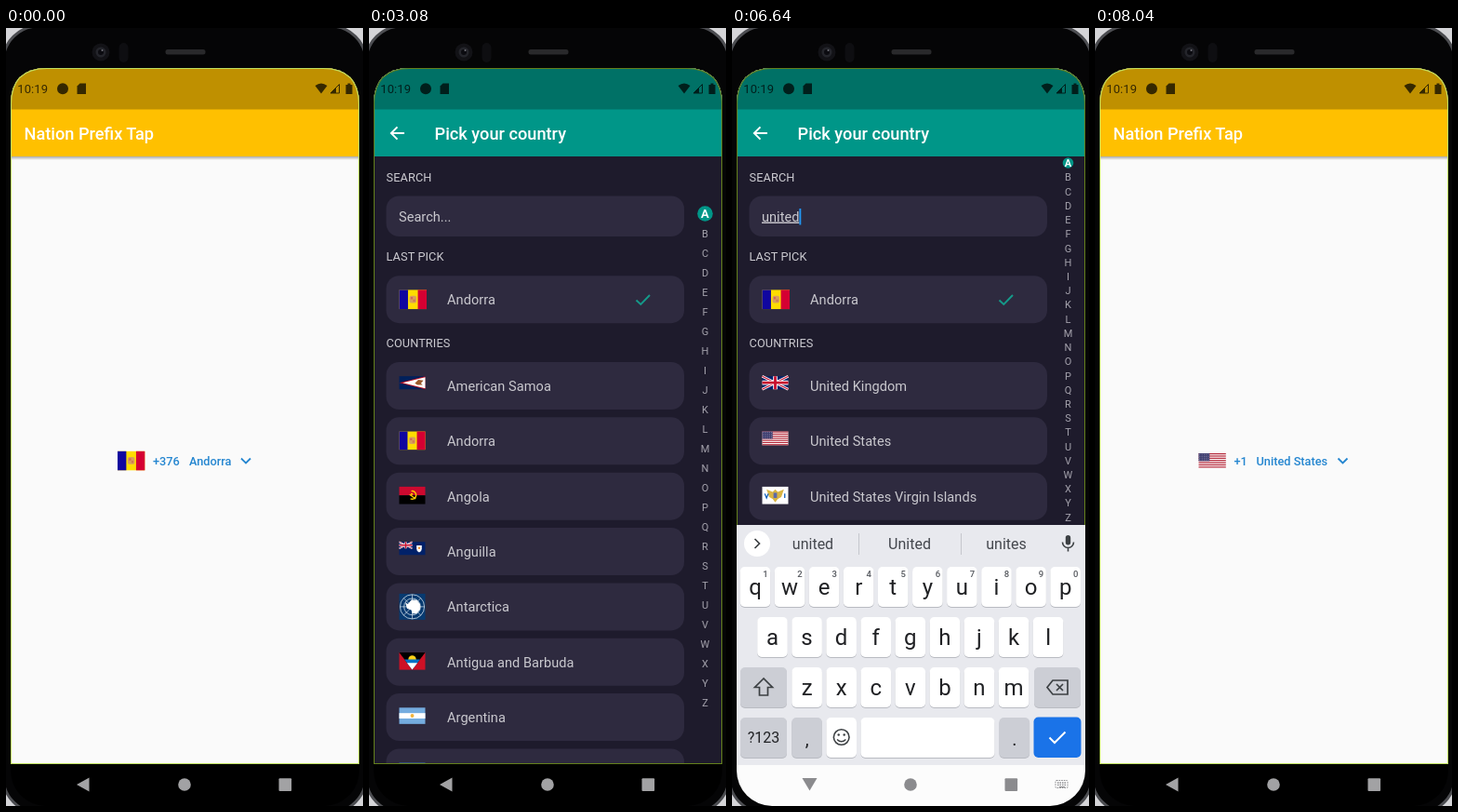
Animation, 384 px wide and 836 px high, one loop 8.08 s. Source, as an HTML page:

```html
<!DOCTYPE html>
<html lang="en">
<head>
<meta charset="utf-8">
<title>Country picker</title>
<style>
html, body { margin: 0; width: 100%; height: 100%; overflow: hidden; background: #000; }
svg { display: block; width: 100vw; height: 100vh; font-family: Roboto, sans-serif; }
svg svg { overflow: visible; }
text { white-space: pre; }
</style>
</head>
<body>
<svg id="stage" viewBox="0 0 384 836"></svg>
<script>
const LOOP = 8080, TICK = 40;
const $ = id => document.getElementById(id);
const set = (id, attrs) => { for (const k in attrs) $(id).setAttribute(k, attrs[k]); };

// SVG helpers
const rect = (x, y, w, h, fill, r = 0, more = '') =>
  `<rect x="${x}" y="${y}" width="${w}" height="${h}" rx="${r}" fill="${fill}" ${more}/>`;
const circ = (x, y, r, fill, more = '') => `<circle cx="${x}" cy="${y}" r="${r}" fill="${fill}" ${more}/>`;
const path = (d, fill) => `<path d="${d}" fill="${fill}"/>`;
const line = (d, color, w, more = '') => `<path d="${d}" fill="none" stroke="${color}" stroke-width="${w}" ${more}/>`;
const text = (x, y, size, fill, str, more = '') =>
  `<text x="${x}" y="${y}" font-size="${size}" fill="${fill}" ${more}>${str}</text>`;
const mid = 'text-anchor="middle"';
const medium = 'font-weight="500"';

// Flags, 30 units wide
const bars = (colors, h, side = 10) => rect(0, 0, 30, h, colors[1]) +
  rect(0, 0, side, h, colors[0]) + rect(30 - side, 0, side, h, colors[2]);
const jack = (w, h) => rect(0, 0, w, h, '#012169') +
  line(`M0 0L${w} ${h}M${w} 0L0 ${h}`, '#fff', h / 5) +
  line(`M0 0L${w} ${h}M${w} 0L0 ${h}`, '#c8102e', h / 13) +
  line(`M${w / 2} 0V${h}M0 ${h / 2}H${w}`, '#fff', h / 3) +
  line(`M${w / 2} 0V${h}M0 ${h / 2}H${w}`, '#c8102e', h / 5);
const stripes = () => {
  let s = rect(0, 0, 30, 15.8, '#fff');
  for (let i = 0; i < 7; i++) s += rect(0, i * 2.43, 30, 1.22, '#b22234');
  s += rect(0, 0, 12, 8.5, '#3c3b6e');
  for (let i = 0; i < 20; i++) s += circ(1.4 + i % 5 * 2.3, 1.2 + (i / 5 | 0) * 2, .42, '#fff');
  return s;
};
const globe = () => '<g transform="translate(0 -4)">' + rect(0, 0, 30, 30, '#073a70') +
  [14, 9.5].map(r => circ(15, 15, r, 'none', 'stroke="#dfe8f0" stroke-width=".8"')).join('') +
  line('M15 1V29M1 15H29M5 5L25 25M25 5L5 25', '#dfe8f0', .7) +
  path('M7 10L10 12L14 7L20 7L24 12L24 18L20 23L15 23L14 19L9 17Z', '#fff') + '</g>';
const flags = {
  ad: () => bars(['#10069f', '#fedd00', '#d50032'], 21, 9.6) + rect(11.2, 6.4, 7.6, 8, '#d9a05b', 2) +
    rect(12.6, 7.8, 2.2, 2.4, '#d5625c') + rect(15.2, 10.4, 2.2, 2.6, '#cf7a52'),
  as: () => rect(0, 0, 30, 15, '#00205b') + path('M30 0L0 7.5L30 15Z', '#bd1021') +
    path('M30 1L4 7.5L30 14Z', '#fff') + path('M18 8L22 4L28 5L25 8L27 10L21 10Z', '#9b5a2c'),
  ao: () => rect(0, 0, 30, 10, '#cc092f') + rect(0, 10, 30, 10, '#000') +
    line('M14 5A4.7 4.7 0 1 1 13 14M12 9L19 14', '#ffcb00', 1.5) + circ(14.5, 8.5, 1.2, '#ffcb00'),
  ai: () => rect(0, 0, 30, 15, '#012169') + jack(15, 7.5) +
    path('M20 4H26V8Q26 11 23 12Q20 11 20 8Z', '#fff') + circ(23, 7, 1.3, '#f0922e'),
  aq: globe,
  ag: () => rect(0, 0, 30, 20, '#ce1126') + path('M0 0H30L15 20Z', '#000') + circ(15, 8, 4.5, '#fcd116') +
    path('M6 8H24L15 20Z', '#0072c6') + path('M9 12H21L15 20Z', '#fff'),
  ar: () => rect(0, 0, 30, 18.8, '#74acdf') + rect(0, 6.3, 30, 6.2, '#fff') + circ(15, 9.4, 2.1, '#f2b43c'),
  aw: () => rect(0, 0, 30, 20, '#418fde') + rect(0, 13, 30, 1.2, '#fbe122') + rect(0, 15.5, 30, 1.2, '#fbe122') +
    path('M6 2L7 5L10 6L7 7L6 10L5 7L2 6L5 5Z', '#ef3340'),
  bi: () => rect(0, 0, 30, 18, '#ce1126') + path('M0 0L15 9L0 18ZM30 0L15 9L30 18Z', '#1eb53a') +
    line('M0 0L30 18M30 0L0 18', '#fff', 3) + circ(15, 9, 5, '#fff') +
    circ(15, 6.6, 1.2, '#ce1126') + circ(12.9, 10.4, 1.2, '#ce1126') + circ(17.1, 10.4, 1.2, '#ce1126'),
  gl: () => rect(0, 0, 30, 10, '#fff') + rect(0, 10, 30, 10, '#d00c33') +
    path('M5 10A6.5 6.5 0 0 1 18 10Z', '#d00c33') + path('M5 10A6.5 6.5 0 0 0 18 10Z', '#fff'),
  re: () => bars(['#002395', '#fff', '#ed2939'], 20),
  gb: () => jack(30, 15),
  us: stripes,
  vi: () => rect(0, 0, 30, 20, '#fff') + path('M5 3L12 6L15 3L18 6L25 3L22 12L18 14L15 18L12 14L8 12Z', '#d9b443') +
    rect(13, 7, 4, 6, '#5d6aa8') + line('M3 8L5 13L7 8M26 8V13', '#0057b7', 1.3)
};
const flag = (code, x, y, w) =>
  `<svg x="${x}" y="${y}" width="${w}" height="${w}" viewBox="0 0 30 30">${flags[code]()}</svg>`;

const names = {
  as: 'American Samoa', ad: 'Andorra', ao: 'Angola', ai: 'Anguilla', aq: 'Antarctica',
  ag: 'Antigua and Barbuda', ar: 'Argentina', aw: 'Aruba', bi: 'Burundi', gl: 'Kalaallit Nunaat',
  re: 'La Réunion', gb: 'United Kingdom', us: 'United States', vi: 'United States Virgin Islands'
};

// Timeline tables: [start ms, value]
const at = (table, t) => table.reduce((v, row) => t >= row[0] ? row[1] : v, table[0][1]);
const typed = [[0, ''], [4200, 'u'], [4520, 'un'], [4840, 'uni'], [5000, 'unit'], [5400, 'unite'], [5480, 'united']];
const found = [[0, 'as ad ao ai aq ag ar aw'], [4200, 'ai ag aw'], [4560, 'bi gl re'], [4840, 're gb us'], [5000, 'gb us vi']];
const hints = [[0, ''], [4200, 'u,you,I'], [4560, "un,in,I'm"], [5000, 'unit,United,units'],
  [5400, 'unite,United,unites'], [5480, 'united,United,unites'], [6680, '']];
const caret = [[0, 0], [3320, 1], [5640, .5], [5680, 0], [5840, .5], [5960, 1], [6680, 0]];

const clamp = v => Math.min(1, Math.max(0, v));
function bezier(x1, y1, x2, y2, x) {
  const f = (a, b, s) => 3 * (1 - s) * (1 - s) * s * a + 3 * (1 - s) * s * s * b + s * s * s;
  let lo = 0, hi = 1;
  for (let i = 0; i < 24; i++) {
    const m = (lo + hi) / 2;
    f(x1, x2, m) < x ? lo = m : hi = m;
  }
  return f(y1, y2, lo);
}

// Static pieces
const SCREEN = 'M5 791V82Q5 43 44 43H341Q380 43 380 82V791Z';
const GLASS = 'M5 500H380V798A38 38 0 0 1 342 836H43A38 38 0 0 1 5 798Z';
const card = (y, h) => rect(18.5, y, 320.5, h, '#2e2a3f', 14);
const label = (y, s) => text(18.5, y, 12.75, '#cbcad0', s, 'letter-spacing=".1"');
const item = (code, cy, w) => card(cy - 25.5, 51) + flag(code, 32.5, cy - 10.3, w) +
  text(84, cy + 5.3, 14.6, '#c9c8ce', names[code], 'letter-spacing=".03"');
const rows = list => list.split(' ').map((c, i) => item(c, 384.5 + i * 59.35, 28)).join('');

const phone = () => rect(0, 0, 384, 836, '#d5d5d8') +
  rect(-3, -2, 390, 845, '#050506', 38, 'stroke="#4c4d51" stroke-width="3"') +
  circ(102, 26, 9.5, '#121216') + circ(102, 26, 5.5, '#24252b') + circ(102, 26, 3, '#0b0b10') + circ(103.5, 24, 1, '#75757c') +
  rect(121.5, 16, 10, 21, '#0e0e11', 5) + rect(171.5, 23, 43, 5.5, '#29292b', 2.5) + path(GLASS, '#000');

const home = () => rect(5, 43, 375, 748, '#fafafa') +
  rect(5, 138, 375, 4, 'url(#shade)') + rect(5, 43, 375, 95, '#ffc000') +
  text(19.5, 120, 18.2, '#fff', 'Nation Prefix Tap', medium) +
  '<g id="pick"><g id="ripple" clip-path="url(#button)">' + circ(237.5, 465, 25, '#eff5fa') + '</g>' +
  '<g id="choice"></g></g>';
const choice = code => {
  const us = code === 'us', x = us ? 111.5 : 120, name = us ? 173.5 : 197, arrow = us ? 266.5 : 258;
  return flag(code, x, us ? 457 : 454.8, 29.3) +
    text(us ? 149.5 : 158, 469.5, 12.76, '#2586d0', us ? '+1' : '+376', medium) +
    text(name, 469.5, 12.76, '#2586d0', names[code], medium) +
    line(`M${arrow - 5} 462.5l5 5l5 -5`, '#2586d0', 1.8);
};

const list = () => rect(5, 43, 375, 748, '#fafafa') + rect(5, 43, 375, 95, '#009688') +
  line('M38 113H24M30.5 106.3L23.8 113L30.5 119.7', '#fff', 1.9) +
  text(70.5, 120, 18.2, '#fff', 'Pick your country', medium) +
  '<g clip-path="url(#body)">' + rect(5, 138, 375, 653, '#1e1b2c') +
  label(164.5, 'SEARCH') + card(180.5, 43.5) +
  '<text id="query" x="32" y="207.5" font-size="14.6" fill="#c9c8ce"></text>' +
  '<rect id="caret" y="194" width="1.9" height="17.5" fill="#2196f3"/>' +
  label(250, 'LAST PICK') + item('ad', 291.7, 29.5) + line('M287.5 292.5L292.3 297L302 287', '#159a8a', 1.9) +
  label(343, 'COUNTRIES') + '<g id="rows"></g><g id="index"></g></g>';

const index = small => {
  const top = small ? 145 : 199.5, gap = small ? 15.22 : 21.03;
  return circ(361.5, top, small ? 5.8 : 8.3, '#009688') + [...'ABCDEFGHIJKLMNOPQRSTUVWXYZ'].map((c, i) =>
    text(361.5, top + i * gap + 4.2, i || small ? 11 : 13, i ? '#a5a3ad' : '#fff', c,
      mid + (i ? '' : ' font-weight="700"'))).join('');
};

const status = () => rect(5, 43, 375, 44.5, '#000', 0, 'opacity=".25"') + '<g opacity=".72">' +
  text(12.3, 70, 13, '#000', '10:19', 'letter-spacing=".1"') + circ(61, 65.3, 6, '#000') +
  path('M79.5 59.5H86V71H76.5V62.5Z', '#000') +
  path('M332.5 62Q339 57 345.5 62L339 70.5Z', '#000') +
  line('M349 70L358.5 60.5V70Z', '#000', 1) + path('M349 70L355 64V70Z', '#000') +
  path('M365.5 61H367.5V59.5H370.5V61H372.5V71H365.5Z', '#000') + '</g>';

function keyboard() {
  const ink = '#202124', icon = '#3c4043', grey = '#ccced5', pitch = 37.07;
  const key = (x, y, w, fill) => rect(x, y + 1, w, 43, '#b9bbc2', 5) + rect(x, y, w, 43, fill, 5);
  const letters = (str, x, y, digits) => [...str].map((c, i) => {
    const cx = x + i * pitch;
    return key(cx - 16.3, y, 32.6, '#fff') + text(cx, y + 29.5, 24, ink, c, mid) +
      (digits ? text(cx + 11, y + 11, 9.5, '#55585e', (i + 1) % 10, mid + medium) : '');
  }).join('');
  return rect(5, 534, 375, 258, '#e8e9ee') + rect(5, 792, 375, 44, '#fcfcfc') +
    circ(27, 554, 14, '#fff') + line('M24.5 549L29.5 554L24.5 559', icon, 1.7) +
    '<g id="hints"></g>' +
    rect(358.8, 545, 5.4, 10.5, icon, 2.7) + line('M355.5 552.5a6 6 0 0 0 12 0M361.5 558.5V562.5', icon, 1.6) +
    letters('qwertyuiop', 25, 579, true) + letters('asdfghjkl', 43.5, 633) + letters('zxcvbnm', 80.6, 687) +
    key(9, 687, 50, grey) + line('M34 699L24.5 708.5H29.5V717H38.5V708.5H43.5Z', icon, 1.7) +
    key(325, 687, 50, grey) + line('M339 708.5L345 701H361V716H345ZM349 705L356 712M356 705L349 712', icon, 1.7) +
    key(9, 741, 50, grey) + text(34, 768, 16, ink, '?123', mid) +
    key(64.3, 741, 32.6, grey) + text(80.6, 771, 20, ink, ',', mid) +
    key(101.4, 741, 32.6, '#fff') + circ(117.7, 762, 8.3, 'none', `stroke="${icon}" stroke-width="1.6"`) +
    circ(114.7, 759.5, 1.2, icon) + circ(120.7, 759.5, 1.2, icon) + line('M113 764.5q4.7 4.6 9.4 0', icon, 1.5) +
    key(138.5, 741, 144, '#fff') + key(287.5, 741, 32.6, grey) + text(303.8, 771, 20, ink, '.', mid) +
    rect(324.5, 740.5, 51, 43.5, '#1a73e8', 5) + line('M341.5 762.5L347 768L358.5 756.5', '#fff', 2);
}
const hintBar = str => !str ? '' : rect(136, 543, 1, 23, '#c5c7cd') + rect(246, 543, 1, 23, '#c5c7cd') +
  str.split(',').map((s, i) => text(87 + i * 104, 560, 16, '#44474d', s, mid)).join('');
const nav = () => '<path id="back" fill="currentColor"/>' + circ(192, 813, 6.8, 'currentColor') +
  rect(293.5, 806.3, 13.6, 13.6, 'currentColor', 1) +
  '<g id="keys">' + rect(348, 808.5, 13, 8, 'none', 1, 'stroke="currentColor" stroke-dasharray="1.6 1"') +
  line('M350 811H360M350 813.3H360', 'currentColor', 1.3, 'stroke-dasharray="1.5 1"') +
  line('M352 815.5H358', 'currentColor', 1) + '</g>';

$('stage').innerHTML = `<defs>
  <clipPath id="screen"><path d="${SCREEN}"/></clipPath>
  <clipPath id="glass"><path d="${GLASS}"/></clipPath>
  <clipPath id="body"><rect id="bodyRect" x="5" y="138" width="375"/></clipPath>
  <clipPath id="button"><rect x="112" y="447" width="150" height="36" rx="4"/></clipPath>
  <linearGradient id="shade" x2="0" y2="1"><stop stop-color="#000" stop-opacity=".32"/><stop offset="1" stop-color="#000" stop-opacity="0"/></linearGradient>
  </defs>${phone()}
  <g clip-path="url(#screen)"><g>${home()}</g><g id="list">${list()}</g>${status()}
  <path id="edge" d="${SCREEN}" fill="none" stroke-width="2"/></g>
  <g clip-path="url(#glass)"><g id="keyboard">${keyboard()}</g></g>
  <g id="nav">${nav()}</g>`;

// Rebuild a group only when its key changes
const shown = {};
function fill(id, key, make) {
  if (shown[id] === key) return;
  shown[id] = key;
  $(id).innerHTML = make(key);
}

function draw(t) {
  const inset = t >= 3480 && t < 6880;
  const page = t < 1840 ? 0 : t < 1880 ? .5 : clamp(1 - (t - 6774) / 300);
  const query = at(typed, t), focus = t >= 3320 && t < 6680;

  fill('choice', t < 6680 ? 'ad' : 'us', choice);
  set('pick', { transform: `translate(0 ${inset ? -128.5 : 0})` });
  set('ripple', { visibility: t >= 1560 && t < 1880 ? 'visible' : 'hidden' });

  fill('rows', at(found, t), rows);
  fill('index', inset, index);
  set('bodyRect', { height: inset ? 396 : 653 });
  set('list', {
    visibility: page > 0 ? 'visible' : 'hidden',
    opacity: bezier(.42, 0, 1, 1, page),
    transform: `translate(0 ${198 * (1 - bezier(.4, 0, .2, 1, page))})`
  });
  const q = $('query');
  q.textContent = query || 'Search...';
  q.setAttribute('text-decoration', query && focus ? 'underline' : 'none');
  set('caret', { x: 32 + (query ? q.getComputedTextLength() : 0), opacity: at(caret, t) });

  const rise = clamp((t - 3360) / 320), fall = clamp((t - 6640) / 240);
  const drop = t < 6640 ? Math.pow(1 - rise, 2.2) : 1 - Math.pow(1 - fall, 1.4);
  set('keyboard', { transform: `translate(0 ${302 * drop})`, visibility: drop < 1 ? 'visible' : 'hidden' });
  fill('hints', at(hints, t), hintBar);

  const open = drop < .3;
  set('nav', { color: open ? '#8b8b8e' : drop < 1 ? '#d2d2d4' : '#a2a2a4' });
  set('back', { d: open ? 'M75.5 806H91.5L83.5 819.5Z' : 'M89.5 805.5V820.5L76 813Z' });
  set('keys', { visibility: open ? 'visible' : 'hidden' });
  set('edge', { stroke: page > .9 ? '#64801c' : '#bfe060' });
}

const start = performance.now();
function frame() {
  const t = (performance.now() - start) % LOOP;
  draw(Math.floor(t / TICK) * TICK);
  requestAnimationFrame(frame);
}
frame();
</script>
</body>
</html>
```
